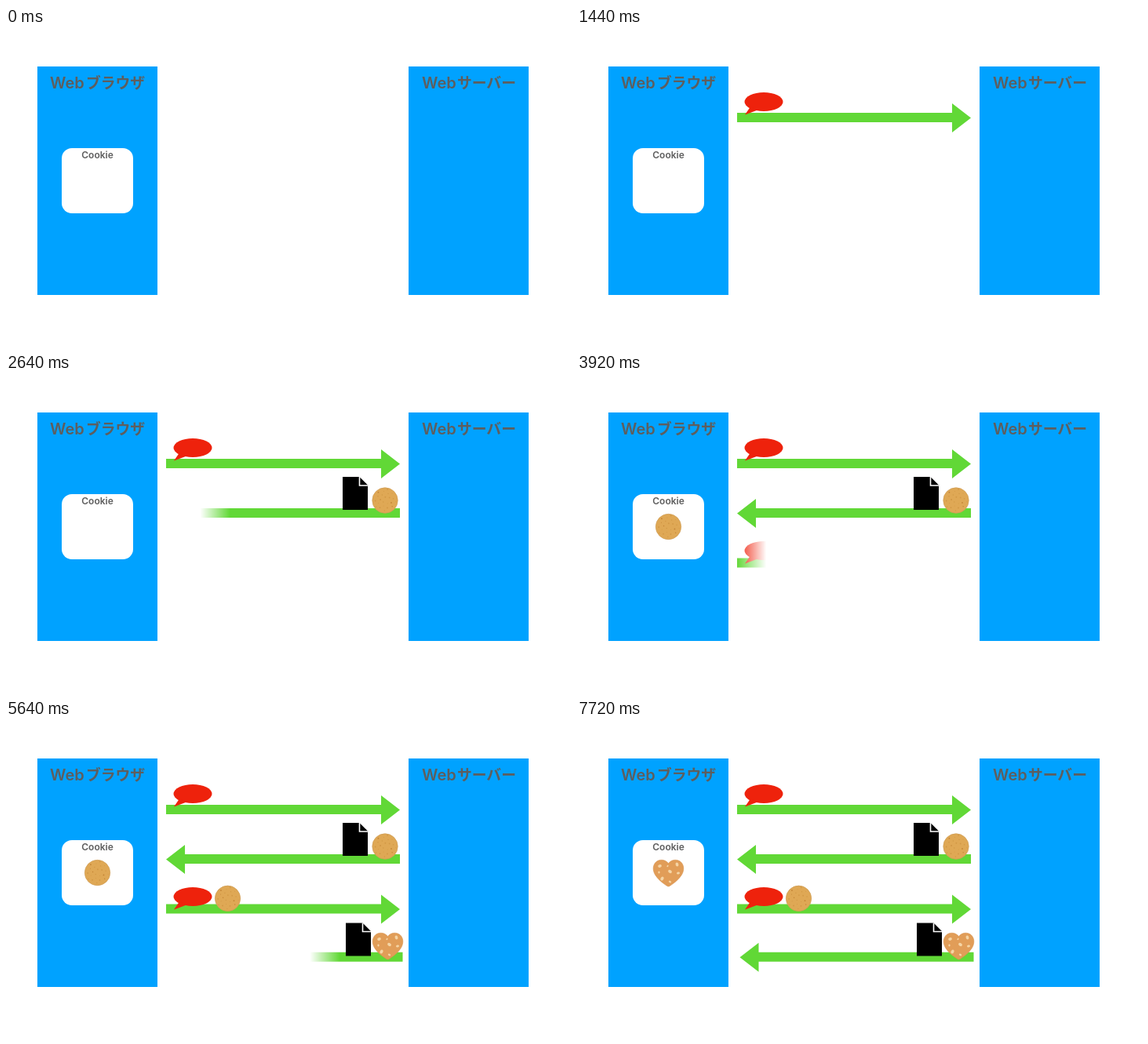
An HTML page for the animation above (8.2 s loop, 720 by 405 pixels).

```html
<!DOCTYPE html>
<html lang="ja">
<head>
<meta charset="utf-8">
<title>Cookie</title>
<style>
  html, body { margin: 0; width: 100%; height: 100%; overflow: hidden; background: #fff; }
  svg { display: block; width: 720px; height: 405px; }
  text { fill: #5e5e5e; font: 600 20px Inter, "Liberation Sans", sans-serif; }
  .kana { font: 700 18.8px "Noto Sans CJK JP", "Noto Sans CJK", sans-serif; }
  .small { font-size: 12px; text-anchor: middle; }
</style>
</head>
<body>
<svg viewBox="0 0 720 405">
  <defs id="defs">
    <path id="arrow" d="M0 12H274V0L298 18.5L274 37V24H0Z" fill="#61d836"/>
    <g id="bubble" fill="#ee220c">
      <ellipse cx="24.5" cy="12" rx="24.5" ry="12"/>
      <path d="M7 19L.5 28.5L18 22Z"/>
    </g>
    <g id="doc">
      <path d="M0 0H21.5L32 10.5V42H0Z"/>
      <path d="M21.5 0V11H32" fill="none" stroke="#fff" stroke-width="1.6"/>
    </g>
    <g id="cookie">
      <circle r="16.2" fill="#dfa855" stroke="#cf9d55" stroke-width=".7"/>
    </g>
    <g id="heart">
      <path d="M0 -12.5C4 -17.5 11 -18 15.5 -14.5C20 -10.5 20.5 -4 17 2C13.5 8 7 13 1.5 16.5Q0 17.3 -1.5 16.5C-7 13 -13.5 8 -17 2C-20.5 -4 -20 -10.5 -15.5 -14.5C-11 -18 -4 -17.5 0 -12.5Z"
        fill="#e19d58" stroke="#d8924e" stroke-width=".6"/>
    </g>
  </defs>

  <path d="M40 49H193V340H40ZM513 49H666V340H513Z" fill="#00a2ff"/>
  <text x="56" y="77">Web</text><text class="kana" x="102" y="77">ブラウザ</text>
  <text x="530" y="77">Web</text><text class="kana" x="575" y="77">サーバー</text>
  <rect x="71" y="153" width="91" height="83" rx="13" fill="#fff"/>
  <text class="small" x="116.5" y="166">Cookie</text>

  <g class="row">
    <use href="#arrow" x="204" y="96"/>
    <use href="#bubble" x="213.5" y="82"/>
  </g>
  <g class="row">
    <use href="#arrow" transform="translate(502 159) scale(-1 1)"/>
    <use href="#doc" x="429" y="131"/>
    <use href="#cookie" x="483" y="161"/>
  </g>
  <g class="row">
    <use href="#arrow" x="204" y="222.5"/>
    <use href="#bubble" x="213.5" y="213"/>
    <use href="#cookie" x="282.5" y="227.3"/>
  </g>
  <g class="row">
    <use href="#arrow" transform="translate(505.5 283.7) scale(-1 1)"/>
    <use href="#doc" x="433" y="258.5"/>
    <use href="#heart" x="486.5" y="288"/>
  </g>
  <use id="stored" href="#cookie"/>
  <use id="renewed" href="#heart" x="116.5" y="195"/>
</svg>
<script>
const LOOP = 8200, STEP = 40, WIPE = 990, LEAD = 70, SOFT = 38, WIDTH = 298;
const $ = id => document.getElementById(id);

function add(parent, tag, attrs) {
  const el = document.createElementNS('http://www.w3.org/2000/svg', tag);
  for (const k in attrs) el.setAttribute(k, attrs[k]);
  return parent.appendChild(el);
}

// Crumbs on the round cookie
for (let i = 1; i < 24; i++) {
  const r = 3 * Math.sqrt(i), a = i * 2.4;
  add($('cookie'), 'circle', {
    cx: r * Math.cos(a), cy: r * Math.sin(a), r: 0.5 + (i % 3) * 0.2,
    fill: i % 4 ? '#d29845' : '#c38436'
  });
}

// Nuts on the heart
[[-11, -9, 2.4], [2, -2, 2.5], [11, -11, 2.5], [-8, 7, 2.6], [12.5, 0, 2], [2, 11, 1.8], [-12, -1, 1.5], [-1, -9, 1.3]]
  .forEach(([x, y, r], i) => add($('heart'), 'ellipse', {
    rx: r, ry: r * 0.75, fill: '#f5d5a5',
    transform: `translate(${x} ${y}) rotate(${i * 47 - 20})`
  }));

// start, end, edge where the wipe begins, direction
const wipes = [
  [520, 1440, 204, 1],
  [1960, 2880, 502, -1],
  [3880, 4800, 204, 1],
  [5360, 6240, 506, -1]
].map(([start, end, edge, dir], i) => {
  const grad = add($('defs'), 'linearGradient', { id: 'g' + i, gradientUnits: 'userSpaceOnUse', y1: 0, y2: 0 });
  add(grad, 'stop', { offset: 0, 'stop-color': '#fff' });
  add(grad, 'stop', { offset: 1, 'stop-color': '#fff', 'stop-opacity': 0 });
  const mask = add($('defs'), 'mask', { id: 'm' + i, maskUnits: 'userSpaceOnUse', x: 0, y: 0, width: 720, height: 405 });
  add(mask, 'rect', { width: 720, height: 405, fill: `url(#g${i})` });
  return { start, end, edge, dir, grad, id: i, row: document.querySelectorAll('.row')[i] };
});

const show = (el, on) => el.setAttribute('visibility', on ? 'visible' : 'hidden');

function drawWipe({ start, end, edge, dir, grad, id, row }, t) {
  show(row, t >= start);
  if (t >= end) return row.removeAttribute('mask');
  const front = (t - start + LEAD) / WIPE * (WIDTH + SOFT);
  grad.setAttribute('x1', edge + dir * (front - SOFT));
  grad.setAttribute('x2', edge + dir * front);
  row.setAttribute('mask', `url(#m${id})`);
}

function draw(time) {
  const t = Math.floor((time % LOOP + 0.5) / STEP) * STEP;
  wipes.forEach(w => drawWipe(w, t));

  // The old cookie bursts outward and fades
  const pop = Math.min(1, Math.max(0, (t - 6720) / 240));
  show($('stored'), t >= 3400 && pop < 1);
  $('stored').setAttribute('transform', `translate(116.5 194.5) scale(${1 + 3.3 * pop})`);
  $('stored').setAttribute('opacity', 1 - pop);
  show($('renewed'), t >= 7720);
}

let origin;
function tick(now) {
  origin ??= now;
  draw(now - origin);
  requestAnimationFrame(tick);
}
draw(0);
requestAnimationFrame(tick);
</script>
</body>
</html>
```
